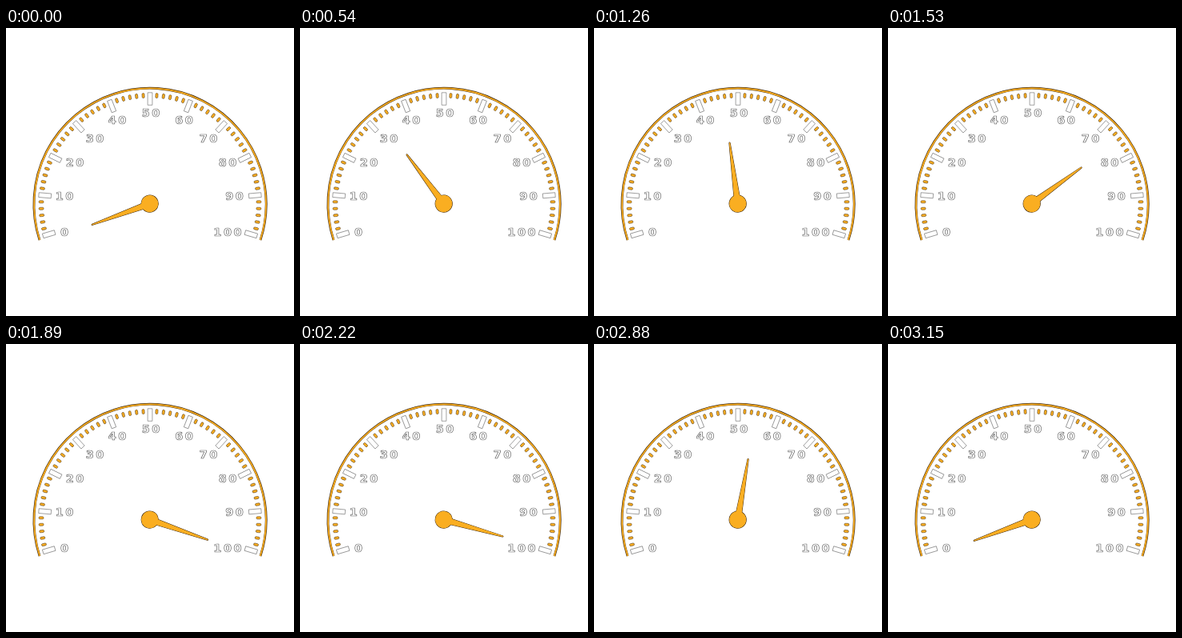
An HTML page with a canvas that plays this animation: 360 px wide and 360 px high, repeating every 3180 ms.

```html
<!DOCTYPE html>
<html lang="en">
<head>
<meta charset="utf-8">
<title>Gauge</title>
<style>
html, body { margin: 0; width: 100%; height: 100%; overflow: hidden; background: #fff; }
canvas { display: block; width: 360px; height: 360px; }
</style>
</head>
<body>
<canvas id="stage" width="360" height="360"></canvas>
<script>
const ctx = document.getElementById('stage').getContext('2d');
const LOOP = 3180, STEP = 30;
const DIAL = [180, 220.3], HUB = [179.7, 219.6];
const SPREAD = 106.5;            // angle of the first and last mark, from straight up
const ORANGE = '#faae21', EDGE = '#40280a', GREY = '#666';
const rad = deg => deg * Math.PI / 180;

// [time, needle angle], eased between neighbours
const keys = [[0, -110], [540, -37], [930, -47.4], [1935, 110],
              [2220, 105.8], [2640, 110], [3150, -110]];

// label centres
const labels = [[73, 255], [73, 210], [86, 167.5], [111, 137.5], [139, 115], [181, 105.5],
                [222.5, 115], [253, 137.5], [277, 168], [285.5, 209.5], [277, 254.5]];

function needleAngle(t) {
  for (let i = 1; i < keys.length; i++) {
    const [t0, a0] = keys[i - 1], [t1, a1] = keys[i];
    if (t <= t1) {
      const u = (t - t0) / (t1 - t0);
      return a0 + (a1 - a0) * u * u * (3 - 2 * u);
    }
  }
  return keys[keys.length - 1][1];
}

function rotated([x, y], deg, draw) {
  ctx.save();
  ctx.translate(x, y);
  ctx.rotate(rad(deg));
  draw();
  ctx.restore();
}

function paint(fill, line, width) {
  ctx.fillStyle = fill;
  ctx.strokeStyle = line;
  ctx.lineWidth = width;
  ctx.fill();
  ctx.stroke();
}

function rim(r, width, color) {
  ctx.beginPath();
  ctx.arc(...DIAL, r, rad(-198), rad(18));
  ctx.lineWidth = width;
  ctx.strokeStyle = color;
  ctx.stroke();
}

function majorTick() {
  ctx.beginPath();
  ctx.rect(-2.9, -139.5, 5.8, 15.5);
  paint('#fff', GREY, 0.6);
}

function minorTick() {
  ctx.beginPath();
  ctx.roundRect(-1.5, -139, 3, 6, 1.4);
  paint(ORANGE, EDGE, 0.5);
}

function drawScale() {
  rim(145.1, 2.8, EDGE);
  rim(144.9, 1.8, ORANGE);
  for (let i = 0; i <= 60; i++)
    rotated(DIAL, -SPREAD + i * SPREAD / 30, i % 6 ? minorTick : majorTick);
}

function drawLabels() {
  const gap = 2.5;
  ctx.font = 'bold 14.5px "DejaVu Sans", sans-serif';
  ctx.letterSpacing = gap + 'px';
  ctx.textAlign = 'center';
  ctx.textBaseline = 'alphabetic';
  ctx.lineJoin = 'round';
  ctx.lineWidth = 0.7;
  ctx.strokeStyle = GREY;
  ctx.fillStyle = '#fff';
  labels.forEach(([x, y], i) => {
    const text = String(i * 10);
    ctx.fillText(text, x + gap / 2, y + 5);
    ctx.strokeText(text, x + gap / 2, y + 5);
  });
}

function drawNeedle(deg) {
  rotated(HUB, deg, () => {
    const shape = new Path2D();
    shape.moveTo(-3.6, -8);
    shape.lineTo(-0.6, -76.5);
    shape.quadraticCurveTo(0, -78, 0.6, -76.5);
    shape.lineTo(3.6, -8);
    shape.closePath();
    const hub = new Path2D();
    hub.arc(0, 0, 10.6, 0, 2 * Math.PI);
    ctx.strokeStyle = EDGE;
    ctx.lineWidth = 1;
    ctx.stroke(shape);
    ctx.stroke(hub);
    ctx.fillStyle = ORANGE;
    ctx.fill(shape);
    ctx.fill(hub);
  });
}

function frame(now) {
  const t = Math.floor((now % LOOP) / STEP) * STEP;
  ctx.fillStyle = '#fff';
  ctx.fillRect(0, 0, 360, 360);
  drawScale();
  drawLabels();
  drawNeedle(needleAngle(t));
}

let start;
function tick(now) {
  if (start === undefined) start = now;
  frame(now - start);
  requestAnimationFrame(tick);
}
frame(0);
requestAnimationFrame(tick);
</script>
</body>
</html>
```
